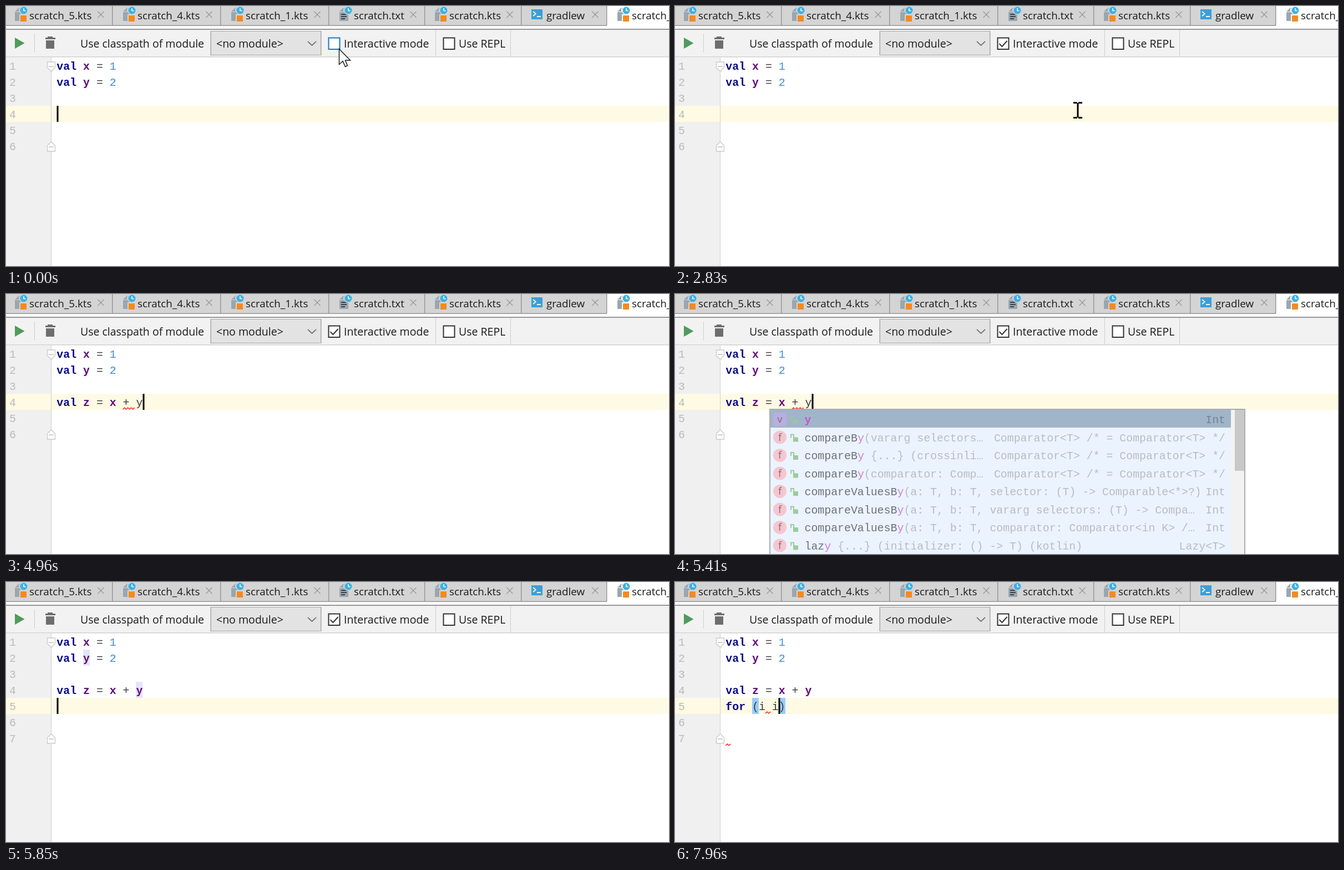
Recreate the animation shown at these times as an HTML page with a canvas. Size 1195x469 px, loop 8 s.

```html
<!DOCTYPE html>
<html lang="en">
<head>
<meta charset="utf-8">
<style>
html, body { margin: 0; width: 1195px; height: 469px; overflow: hidden; background: #fff; }
canvas { display: block; }
</style>
</head>
<body>
<canvas id="stage" width="1195" height="469"></canvas>
<script>
const c = document.getElementById('stage').getContext('2d');
const MONO = '19.88px "Liberation Mono", monospace';
const UI = '"Open Sans", "Noto Sans", sans-serif';
const LOOP = 8000, CHAR = 11.93, LINE = 29;

const colX = col => 91.3 + CHAR * col;
const rowY = row => 93 + LINE * (row - 1);

function rect(x, y, w, h, color) {
  c.fillStyle = color;
  c.fillRect(x, y, w, h);
}
function path(points, { fill, stroke, width = 1, open } = {}) {
  c.beginPath();
  points.forEach(([x, y]) => c.lineTo(x, y));
  if (!open) c.closePath();
  if (fill) { c.fillStyle = fill; c.fill(); }
  if (stroke) { c.strokeStyle = stroke; c.lineWidth = width; c.stroke(); }
}
function line(stroke, width, ...points) {
  path(points, { stroke, width, open: true });
}
function disc(x, y, r, color) {
  c.fillStyle = color;
  c.beginPath();
  c.arc(x, y, r, 0, 7);
  c.fill();
}
function text(s, x, y, color, font, align = 'left') {
  c.font = font;
  c.fillStyle = color;
  c.textAlign = align;
  c.fillText(s, x, y);
}

// Each step changes some properties and keeps the others.
const steps = [
  [0, { arrow: [600, 77], beam: null, hover: true, pressed: false, checked: false, caret: true,
        four: '', five: '', known: '', row: 4, lines: 6, waves: [], usage: false, parens: false, popup: false }],
  [190, { caret: false }],
  [290, { arrow: [601, 76] }],
  [400, { arrow: [601, 74] }],
  [620, { pressed: true }],
  [730, { pressed: false, checked: true }],
  [1710, { arrow: null, beam: [728, 188] }],
  [1840, { beam: [740, 196], hover: false }],
  [1950, { beam: [733, 191], caret: true }],
  [2050, { beam: [726, 188] }],
  [2830, { caret: false }],
  [3010, { caret: true, beam: null, four: 'v' }],
  [3280, { four: 'val' }],
  [3360, { four: 'val ' }],
  [3550, { four: 'val z', waves: [[4, 3, 1]] }],
  [3640, { four: 'val z ' }],
  [3730, { four: 'val z =' }],
  [3830, { four: 'val z = ' }],
  [4080, { known: 'z', waves: [[4, 7, 1]] }],
  [4340, { four: 'val z = x' }],
  [4510, { four: 'val z = x ' }],
  [4600, { known: 'zx', waves: [] }],
  [4700, { four: 'val z = x +' }],
  [4790, { four: 'val z = x + ' }],
  [4960, { four: 'val z = x + y', waves: [[4, 10, 2]] }],
  [5410, { popup: true }],
  [5530, { popup: false }],
  [5750, { known: 'zxy', waves: [], usage: true }],
  [5850, { row: 5, lines: 7 }],
  [6180, { five: 'f' }],
  [6280, { five: 'fo', usage: false }],
  [6500, { five: 'for' }],
  [6620, { five: 'for ' }],
  [6850, { five: 'for ()' }],
  [6950, { parens: true, waves: [[7, 0, 1]] }],
  [7300, { caret: false }],
  [7610, { caret: true, five: 'for (i)' }],
  [7730, { five: 'for (i )' }],
  [7960, { five: 'for (i i)', waves: [[7, 0, 1], [5, 6, 1]] }],
];
const stateAt = t => Object.assign({}, ...steps.filter(s => s[0] <= t).map(s => s[1]));

function fileIcon(x, bg, kind) {
  path([[x, 10], [x + 7, 3], [x + 7, 10]], { fill: '#9aa7b0' });
  rect(x, 11, 16, 16, '#9aa7b0');
  rect(x + 8, 3, 8, 9, '#9aa7b0');
  if (kind === 'txt') {
    [14, 18, 22].forEach((y, i) => rect(x + 3, y, i === 2 ? 7 : 10, 2, '#3d4347'));
  } else {
    rect(x + 8, 15, 14, 13, bg);
    rect(x + 10, 17, 11, 11, '#f58a1f');
  }
  disc(x + 16, 8, 8, bg);
  disc(x + 16, 8, 6.5, '#3bb0e5');
  line('#fff', 1.6, [x + 16, 4], [x + 16, 8.5], [x + 19.5, 8.5]);
}

// Left edge, separator, label, icon kind
const tabs = [
  [16, 191, 'scratch_5.kts'], [211, 386, 'scratch_4.kts'], [406, 581, 'scratch_1.kts'],
  [601, 754, 'scratch.txt', 'txt'], [773, 928, 'scratch.kts'], [948, 1082, 'gradlew', 'shell'],
  [1102, 1400, 'scratch_6.kts'],
];
function drawTabs() {
  rect(0, 0, 1083, 35, '#d4d4d4');
  rect(0, 34.5, 1083, 1.5, '#979797');
  for (const [x, end, label, kind] of tabs) {
    if (kind === 'shell') {
      rect(x - 1, 6, 20, 18, '#3a9fd8');
      line('#fff', 1.7, [x + 2, 10], [x + 7, 14], [x + 2, 18]);
      rect(x + 9, 18, 7, 2, '#fff');
    } else {
      fileIcon(x, end > 1195 ? '#fff' : '#d4d4d4', kind);
    }
    text(label, x + 26, 24, '#1a1a1a', '18.8px ' + UI);
    rect(end, 0, 1.5, 35, '#979797');
    const m = end - 20;
    line('#9b9b9b', 1.4, [m - 5.5, 10], [m + 5.5, 21]);
    line('#9b9b9b', 1.4, [m + 5.5, 10], [m - 5.5, 21]);
  }
  rect(0, 41, 1195, 2, '#979797');
}

function checkBox(x, color, fill, checked) {
  rect(x, 56.5, 22, 22.5, color);
  rect(x + 2, 58.5, 18, 18.5, fill);
  if (checked) line(color, 2, [x + 4, 68], [x + 9, 73], [x + 18, 63]);
}
function drawToolbar(s) {
  const label = (str, x) => text(str, x, 75, '#1a1a1a', '19.5px ' + UI);
  rect(0, 43, 1195, 49, '#f2f2f2');
  rect(0, 91, 1195, 1.5, '#cfcfcf');
  path([[16, 57], [33.5, 67], [16, 77]], { fill: '#4f9a5e' });
  [[51, 50, 34], [774, 43, 48], [909, 43, 48]].forEach(([x, y, h]) => rect(x, y, 1, h, '#cdcdcd'));
  rect(75, 55, 9, 3, '#6e6e6e');
  rect(71, 57, 18, 3, '#6e6e6e');
  rect(72, 62, 15, 15, '#6e6e6e');
  label('Use classpath of module', 134);
  rect(368.5, 45, 200, 44, '#a5a5a5');
  rect(370, 46, 197, 42, '#e3e3e3');
  label('<no module>', 379);
  line('#555', 1.5, [544, 64], [551.5, 71], [559, 64]);
  checkBox(580.5, s.hover ? '#1477c9' : '#333', s.pressed ? '#cce4f7' : '#fff', s.checked);
  label('Interactive mode', 609);
  checkBox(787.5, '#333', '#fff', false);
  label('Use REPL', 816);
}

function drawCode(row, str, known) {
  for (const m of str.matchAll(/\b(val|for)\b|\S/g)) {
    const word = m[0];
    let color = '#3a3a3a', weight = '';
    if (word.length > 1) { color = '#0a0a84'; weight = 'bold '; }
    else if (known.includes(word)) { color = '#5b0e77'; weight = 'bold '; }
    else if (/\d/.test(word)) color = '#3f8bd0';
    text(word, colX(m.index), rowY(row) + 22, color, weight + MONO);
  }
}
function fold(y, dir) {
  const shape = [[-7, -8], [7, -8], [7, 2], [0, 9], [-7, 2]].map(([dx, dy]) => [81.5 + dx, y + dy * dir]);
  path(shape, { fill: '#fff', stroke: '#c9c9c9', width: 1.3 });
  rect(77, y - .5, 9, 1.3, '#b5b5b5');
}
function wave(row, col, count) {
  const y = rowY(row) + LINE, points = [];
  for (let x = 0; x <= count * CHAR; x += 3) points.push([colX(col) + x, y - (x / 3 % 2 ? 4 : 1)]);
  line('#f00000', 1.2, ...points);
}
function drawEditor(s) {
  const cell = (row, col, color) => rect(Math.round(colX(col)), rowY(row), 12, LINE, color);
  rect(0, 92.5, 81, 377, '#f0f0f0');
  rect(0, rowY(s.row), 1195, LINE, '#fffae3');
  rect(81, 92.5, 1, 377, '#cfcfcf');
  for (let n = 1; n <= s.lines; n++) text(n, 6, rowY(n) + 22, '#bababa', MONO);
  fold(109, 1);
  fold(rowY(s.lines) + 16, -1);
  if (s.usage) { cell(2, 4, '#e4e4ff'); cell(4, 12, '#e4e4ff'); }
  if (s.parens) { cell(5, 4, '#99ccff'); cell(5, s.five.length - 1, '#99ccff'); }
  drawCode(1, 'val x = 1', 'x');
  drawCode(2, 'val y = 2', 'y');
  drawCode(4, s.four, s.known);
  drawCode(5, s.five, '');
  s.waves.forEach(w => wave(...w));
  if (s.caret) {
    const typed = s.row === 4 ? s.four : s.five.replace(')', '');
    rect(Math.floor(colX(typed.length) - .3) + .5, rowY(s.row), 3, LINE, '#000');
  }
}

// Name, parameters, type
const comparator = 'Comparator<T> /* = Comparator<T> */';
const hints = [
  ['y', '', 'Int'],
  ['compareBy', '(vararg selectors…', comparator],
  ['compareBy', ' {...} (crossinli…', comparator],
  ['compareBy', '(comparator: Comp…', comparator],
  ['compareValuesBy', '(a: T, b: T, selector: (T) -> Comparable<*>?)', 'Int'],
  ['compareValuesBy', '(a: T, b: T, vararg selectors: (T) -> Compa…', 'Int'],
  ['compareValuesBy', '(a: T, b: T, comparator: Comparator<in K> /…', 'Int'],
  ['lazy', ' {...} (initializer: () -> T) (kotlin)', 'Lazy<T>'],
];
function drawPopup() {
  rect(170, 207, 858, 262, '#a9adb2');
  rect(172, 209, 854, 260, '#ebf3fe');
  rect(172, 209, 830, 32, '#a0b5c9');
  rect(1002, 209, 24, 260, '#f2f2f2');
  rect(1009, 209, 17, 110, '#c8c8c8');
  hints.forEach(([name, params, type], i) => {
    const y = 227 + 32.5 * i, base = y + 6, end = 233.5 + CHAR * name.length;
    if (i) {
      disc(189, y - 1, 12, '#f5c6cf');
    } else {
      c.fillStyle = '#b9aee0';
      c.beginPath();
      c.roundRect(177, 214, 24, 24, 4);
      c.fill();
    }
    text(i ? 'f' : 'v', 189, base - 1, '#7d6c77', '18px ' + UI, 'center');
    c.globalAlpha = i ? 1 : .6;
    rect(213, y - 1, 9, 8, '#9bcb9b');
    line('#9bcb9b', 2, [209, y], [209, y - 6], [214, y - 6], [214, y]);
    c.globalAlpha = 1;
    text(name.slice(0, -1), 233.5, base, '#6b727a', MONO);
    text('y', end - CHAR, base, i ? '#d07fd6' : '#c457c8', (i ? '' : 'bold ') + MONO);
    c.save();
    c.beginPath();
    c.rect(172, 209, 773, 260);
    c.clip();
    text(params, end, base, '#b7bcc3', MONO);
    c.restore();
    text(type, 992, base, i ? '#b7bcc3' : '#76828e', MONO, 'right');
  });
}

function drawArrow(x, y) {
  const shape = [[0, 0], [0, 28], [6.5, 22], [11, 32], [15, 30], [11, 20.5], [20, 20.5]];
  path(shape.map(([dx, dy]) => [x + .5 + dx, y + .5 + dy]), { fill: '#fff', stroke: '#111', width: 1.4 });
}
function drawBeam(x, y) {
  rect(x - 1.5, y - 13, 3, 26, '#000');
  for (const dy of [-15, 12]) {
    rect(x - 8, y + dy, 7, 3, '#000');
    rect(x + 1, y + dy, 7, 3, '#000');
  }
}

function frame(now) {
  const s = stateAt(now % LOOP);
  rect(0, 0, 1195, 469, '#fff');
  drawTabs();
  drawToolbar(s);
  drawEditor(s);
  if (s.popup) drawPopup();
  if (s.arrow) drawArrow(...s.arrow);
  if (s.beam) drawBeam(...s.beam);
  requestAnimationFrame(frame);
}
requestAnimationFrame(frame);
</script>
</body>
</html>
```
